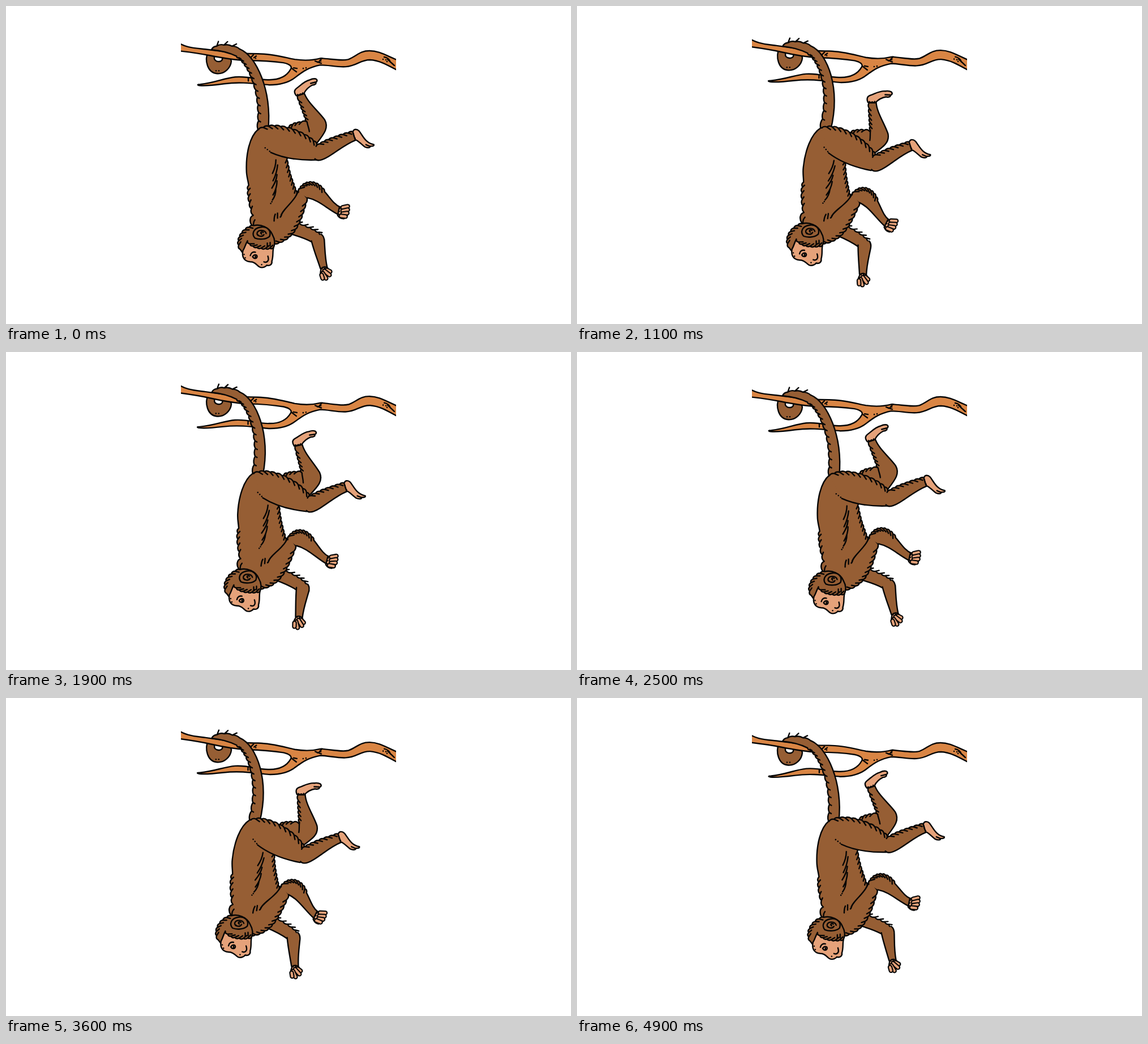
Recreate the animation shown at these times as an HTML page. Size 998 by 561 pixels, loop 5000 ms.

```html
<!DOCTYPE html>
<html lang="en">
<head>
<meta charset="utf-8">
<title>Hanging monkey</title>
<style>
  html, body { margin: 0; width: 100%; height: 100%; overflow: hidden; background: #fff; }
  svg { display: block; width: 100vw; height: 100vh; }
  path { stroke: #050505; stroke-width: 2.4; stroke-linecap: round; stroke-linejoin: round; fill: none; }
  .fur { fill: #965e34; }
  .skin { fill: #e5a27a; }
  .wood { fill: #d98544; }
  .tip { stroke: #e5a27a; stroke-width: 4.2; }
  .tipEdge { stroke-width: 8.4; }
  .dots { stroke-width: 2.6; }
</style>
</head>
<body>
<svg viewBox="0 0 998 561">
  <clipPath id="edge"><rect x="309" y="0" width="380" height="561"/></clipPath>
</svg>
<script>
const svg = document.querySelector('svg');

function add(parent, tag, attrs = {}) {
  const node = document.createElementNS('http://www.w3.org/2000/svg', tag);
  for (const key in attrs) node.setAttribute(key, attrs[key]);
  return parent.appendChild(node);
}
const group = (parent = svg) => add(parent, 'g');
const draw = (parent, cls, d) => add(parent, 'path', { class: cls, d });
const dots = (parent, ...pts) =>
  draw(parent, 'dots', pts.map(([x, y]) => `M${x},${y}h.01`).join(''));
const n1 = v => v.toFixed(1);

function cubic(p, u) {
  const v = 1 - u;
  return [0, 1].map(k => v*v*v*p[0][k] + 3*v*v*u*p[1][k] + 3*v*u*u*p[2][k] + u*u*u*p[3][k]);
}

// Scallops along a curve, each closed by a short hair pointing inwards.
function fur(p, n, h, hair) {
  let d = '', from = p[0];
  for (let i = 1; i <= n; i++) {
    const to = cubic(p, i / n), mid = cubic(p, (i - .5) / n);
    let dx = to[0] - from[0], dy = to[1] - from[1];
    const len = Math.hypot(dx, dy) || 1;
    dx /= len; dy /= len;
    d += `Q${n1(mid[0] + dy * h * 2)},${n1(mid[1] - dx * h * 2)} ${n1(to[0])},${n1(to[1])}`;
    if (i < n) {
      const side = Math.sign(h) * hair * .55;
      const tx = -dx * hair * .8 - dy * side, ty = -dy * hair * .8 + dx * side;
      d += `l${n1(tx)},${n1(ty)}l${n1(-tx)},${n1(-ty)}`;
    }
    from = to;
  }
  return d;
}

function fingers(parent, list) {
  for (const d of list) {
    draw(parent, 'tipEdge', d);
    draw(parent, 'tip', d);
  }
}

// Back to front
const farArm = group(), farFore = group(), farThigh = group(), farShin = group();
const clipped = add(svg, 'g', { 'clip-path': 'url(#edge)' });
const branch = group(clipped);
const tail = draw(svg, 'fur', '');
const body = group(), thigh = group(), shin = group(), fore = group(), head = group();

// Far arm
draw(farArm, 'fur', 'M500,401C515,405 528,409 541,416L562,416L559,404' +
  fur([[559, 404], [548, 392], [530, 388], [507, 377]], 6, 1.8, 6));
draw(farFore, 'fur', 'M540,414C544,430 550,445 556,463L568,461C564,444 564,430 563,416C563,408 560,404 557,402');
draw(farFore, 'skin', 'M557,463C561,459 565,459 569,462L573,468L567,478L557,476L556,470Z');
fingers(farFore, ['M567,465L573,468', 'M563,467L572,474', 'M560,471L566,480', 'M558,474L560,480']);
dots(farFore, [559, 463], [563, 462], [567, 462]);

// Far leg
draw(farThigh, 'fur', 'M500,213' + fur([[500, 213], [508, 206], [518, 206], [530, 203]], 4, 1.6, 5) + 'L548,212L549,242');
draw(farShin, 'fur', 'M536,221C535,213 532,208 532,204' +
  fur([[532, 204], [527, 190], [522, 178], [515, 158]], 6, 1.6, 5) +
  'L527,154C533,170 552,185 563,200C571,214 562,225 549,242');
draw(farShin, 'skin', 'M513,158C508,152 509,148 513,145C521,139 527,132 536,130C540,128 543,127 547,128C551,130 549,134 546,134C550,136 545,139 541,139C535,142 530,146 526,154C522,155 518,156 513,158Z');
draw(farShin, '', 'M546,134L538,136');
dots(farShin, [515, 156], [520, 155], [524, 153]);

// Branch and the curled end of the tail
draw(branch, 'fur', 'M357,80C350,96 356,118 373,119C386,120 397,109 398,97C397,89 387,87 381,89C385,96 378,99 372,97C367,95 367,91 369,86');
dots(branch, [371, 114], [376, 114]);
draw(branch, 'wood', 'M298,60C315,74 335,74 352,76S385,80 400,82C415,84 430,84 445,84C470,84 490,90 510,94' +
  'C530,97 545,95 556,92C580,94 595,97 605,94C620,88 625,79 642,79C660,79 672,88 700,99' +
  'L700,118C672,103 660,96 643,95C625,95 620,106 600,107C585,108 570,104 555,104' +
  'C535,108 525,115 512,125C500,135 485,139 465,139C440,137 415,133 385,137C370,139 355,141 342,140' +
  'C337,139 338,138 343,138C370,135 385,127 405,125C430,123 445,131 465,130C485,130 497,122 503,111' +
  'C506,106 500,102 490,100C470,97 445,96 425,96C400,95 380,91 360,87C345,84 325,81 298,78Z');
draw(branch, '', 'M431,92L437,86M438,91L442,88M546,97L557,101M558,92L553,98M505,110L513,116M508,109L514,110M668,90C674,91 678,95 679,99M674,94L686,105M428,127V132');
dots(branch, [441, 92], [550, 99], [556, 97], [525, 110], [530, 109], [666, 94], [671, 95], [673, 98]);

// Torso with the near upper arm
draw(body, 'fur', 'M446,217C430,230 424,262 425,290C425,300 428,308 429,316' +
  fur([[429, 316], [427, 330], [431, 350], [437, 369]], 5, -2, 5) +
  'C430,372 430,382 436,388L450,405L474,419' +
  fur([[474, 419], [512, 412], [522, 375], [532, 338]], 11, -1.5, 7) +
  'L518,322L514,331' + fur([[514, 331], [506, 310], [498, 290], [495, 262]], 9, -1.4, 6));
draw(body, '', 'M486,371C487,362 500,352 508,341C514,334 516,328 518,322' +
  'M477,271C477,282 474,289 471,295M480,280C479,292 476,300 472,308M479,297C478,308 474,314 470,321M479,308C479,320 475,328 472,333M477,322C477,332 474,338 471,342' +
  'M476,367C474,371 474,376 474,379M480,365V374M440,377C437,381 437,384 438,388');
dots(body, [470, 345], [468, 348], [485, 372], [487, 368]);

// Near leg
draw(thigh, 'fur', 'M468,258C490,268 520,272 548,271L555,256L549,243' +
  fur([[549, 243], [530, 222], [475, 200], [446, 218]], 11, -1.6, 8));
dots(thigh, [458, 250], [462, 253], [466, 256]);
draw(shin, 'fur', 'M546,269C550,274 560,271 570,265C588,254 600,243 618,236L613,221' +
  fur([[613, 221], [590, 228], [565, 235], [548, 247]], 8, -1.4, 7));
draw(shin, 'skin', 'M613,222C614,216 620,216 624,220C631,229 635,241 650,244C651,247 646,247 643,247C645,250 638,250 634,248C627,243 623,237 617,235Z');
draw(shin, '', 'M643,247L636,244');
dots(shin, [614, 225], [615, 229], [617, 233]);

// Near forearm
draw(fore, 'fur', 'M533,338C553,342 567,357 588,368L590,354C580,350 573,338 563,327' +
  fur([[563, 327], [550, 305], [524, 306], [517, 328]], 9, -1.6, 8));
draw(fore, 'skin', 'M589,355C595,352 600,352 604,352L604,368L597,375C592,375 588,372 586,369Z');
fingers(fore, ['M595,355L604,353', 'M595,361L604,359', 'M595,366L603,365', 'M592,370L600,371']);
dots(fore, [590, 357], [589, 362], [588, 367]);

// Head
draw(head, 'fur', 'M438,387' + fur([[438, 387], [418, 392], [405, 412], [414, 429]], 7, -1.6, 7) +
  'L422,440L472,428C477,419 475,410 471,403C466,390 450,384 438,387');
draw(head, 'skin', 'M427,414C423,421 422,427 419,431C417,440 419,450 432,451C441,451 443,457 448,460' +
  'C454,463 460,459 461,457C467,459 471,455 470,450C473,441 471,433 473,426' +
  fur([[473, 426], [458, 429], [434, 428], [427, 414]], 7, 1.4, 8));
draw(head, 'fur', 'M466,406C470,395 460,388 450,390C437,392 434,402 440,409C447,412 460,412 466,406Z');
draw(head, '', 'M460,401C458,394 446,394 444,400C443,406 453,408 456,403M455,399C451,397 449,400 452,402' +
  'M432,440C433,435 437,433 441,434M436,442C439,437 444,438 444,442C443,446 438,446 436,442' +
  'M463,441C466,450 461,453 456,451M462,418V424M467,417V423');
draw(head, 'dots', 'M441,441V443');
dots(head, [452, 456], [421, 438], [423, 444], [446, 404]);

function turn([x, y], [px, py], [qx, qy], deg) {
  const a = deg * Math.PI / 180, c = Math.cos(a), s = Math.sin(a);
  return [qx + (x - px) * c - (y - py) * s, qy + (x - px) * s + (y - py) * c];
}

// Sets a part's pivot p at q and returns a function that carries points along.
function place(part, p, q, deg) {
  part.setAttribute('transform', `translate(${q[0] - p[0]} ${q[1] - p[1]}) rotate(${deg} ${p[0]} ${p[1]})`);
  return pt => turn(pt, p, q, deg);
}

// Eased 0..1..0 sway, starting at the given delay.
const PERIOD = 2500;
const sway = (t, delay) => (1 - Math.cos(2 * Math.PI * (t - delay) / PERIOD)) / 2;

const ROOT = [689, 100], BASE = [453, 215], HIP = [455, 235], KNEE = [549, 258],
  FAR_KNEE = [556, 215], ELBOW = [530, 328], FAR_ELBOW = [550, 411], NECK = [450, 396];

function drawTail(onBranch, base, s, lift) {
  const line = [[410, 82], [434, 92]].map(onBranch);
  line.push([462 - 4 * s, 150 + lift / 2], [base[0] + 1, base[1] + 3]);
  const side = (u, sign) => {
    const a = cubic(line, u - .01), b = cubic(line, u + .01);
    const len = Math.hypot(b[0] - a[0], b[1] - a[1]), w = sign * (7 + 2.2 * u) / len;
    const c = cubic(line, u);
    return [c[0] + (b[1] - a[1]) * w, c[1] - (b[0] - a[0]) * w];
  };
  const arch = [[363, 77], [372, 65], [396, 67], [413, 76]].map(onBranch);
  let d = `M${arch[0]}` + fur(arch, 4, 1.3, -9);
  for (let i = 0; i <= 16; i++) d += `L${side(i / 16, 1).map(n1)}`;
  const count = 13;
  let from = side(1, -1);
  d += `L${from.map(n1)}`;
  for (let i = count - 1; i >= 0; i--) {
    const to = side(i / count, -1);
    d += fur([from, from, to, to], 1, 1.6, 0) + (i ? 'l3.5,2l-3.5,-2' : '');
    from = to;
  }
  d += `Q${onBranch([388, 79])} ${arch[0]}`;
  tail.setAttribute('d', d);
}

function pose(t) {
  const s = sway(t, 80), lift = -10.5 * (sway(t, 240) - .12);
  const onBranch = place(branch, ROOT, ROOT, -lift / 380 * 180 / Math.PI);
  const base = [453 - 16.5 * s, 215 + 4.6 * s + .77 * lift];
  drawTail(onBranch, base, s, lift);

  const tilt = 8.6 * s, onBody = place(body, BASE, base, tilt);
  place(farArm, BASE, base, tilt);
  place(head, NECK, onBody(NECK), -1.5 * s);

  const legTilt = 14.3 * s;
  const onThigh = place(thigh, HIP, onBody(HIP), legTilt);
  place(shin, KNEE, onThigh(KNEE), -s);
  const onFarThigh = place(farThigh, BASE, base, legTilt);
  place(farShin, FAR_KNEE, onFarThigh(FAR_KNEE), 17.3 * sway(t, -90));

  place(fore, ELBOW, onBody(ELBOW), 15.5 * sway(t, -200) - 1);
  const reach = 26 * sway(t, 350) - 4.6 + 3 * Math.sin(2 * Math.PI * t / 5000);
  place(farFore, FAR_ELBOW, onBody(FAR_ELBOW), reach);
}

const LOOP = 5000, STEP = 100;
let start;
function tick(now) {
  start ??= now;
  pose(Math.floor((now - start) % LOOP / STEP) * STEP);
  requestAnimationFrame(tick);
}
pose(0);
requestAnimationFrame(tick);
</script>
</body>
</html>
```
